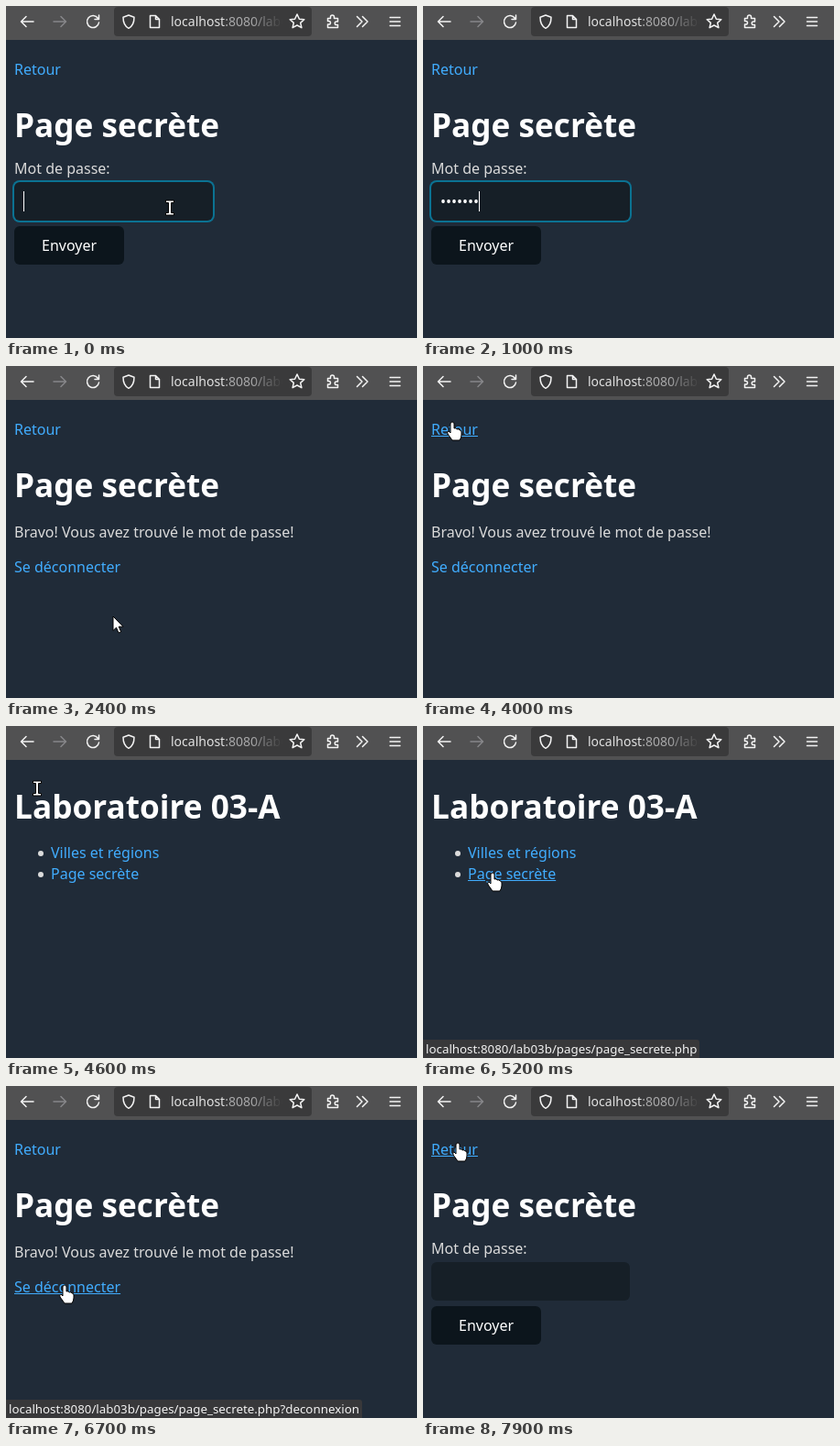
These frames come from a looping animation (449 px wide and 362 px high, 8 s). An HTML page:

```html
<!DOCTYPE html>
<html lang="fr">
<head>
<meta charset="utf-8">
<style>
html, body { margin: 0; width: 100%; height: 100%; overflow: hidden; background: #202b38; }
body { position: relative; font: 16px/22px "Noto Sans", sans-serif; color: #dbdbdb; cursor: default; }
body > * { position: absolute; left: 9px; margin: 0; white-space: pre; }
h1 { font-size: 35.2px; line-height: 48px; font-weight: 700; color: #fff; }
h1, p { cursor: text; }
a { color: #41adff; cursor: pointer; }
a.hover { text-decoration: underline; }
li { list-style: none; left: 49px; }
li::before { content: ""; position: absolute; left: -14px; top: 9px; width: 6px; height: 6px; border-radius: 50%; background: #dbdbdb; }
#field { top: 192px; width: 197px; height: 22px; padding: 10px; border-radius: 6px; background: #161f27; color: #fff; cursor: text; }
#field.focus { box-shadow: 0 0 0 2px #0096bfab; }
#caret { display: inline-block; width: 1px; height: 22px; margin-right: -1px; background: #fff; vertical-align: top; }
#send { top: 240px; padding: 10px 30px; width: 60px; border-radius: 6px; background: #0c151c; color: #fff; cursor: pointer; }
#send.hover { background: #040a0f; }
#bar { left: 0; top: 0; }
#url { left: 180px; top: 7px; width: 122px; overflow: hidden; font-size: 14px; line-height: 20px; color: #a9a9aa;
  -webkit-mask: linear-gradient(90deg, #000 72%, transparent); mask: linear-gradient(90deg, #000 72%, transparent); }
#url b { font-weight: 400; color: #e2e2e2; }
#status { left: 0; top: 342px; height: 20px; padding: 0 3px; background: #38383a; color: #f2f2f2; font-size: 13.33px; line-height: 20px; border-radius: 0 3px 0 0; }
#pointer { left: 0; top: 0; pointer-events: none; }
</style>
</head>
<body>
<svg id="bar" width="449" height="37" fill="none" stroke="#f4f4f4" stroke-width="1.5" stroke-linejoin="round" stroke-linecap="round">
  <path d="M0 0H449V37H0Z" fill="#515152" stroke="none"/>
  <rect x="118" y="1" width="216" height="32" rx="4" fill="#3a3a3b" stroke="none"/>
  <path d="M30 17H17M22 11.5L16.5 17L22 22.5"/>
  <path d="M52 17H65M60 11.5L65.5 17L60 22.5" stroke="#87878a"/>
  <path id="reload" d="M100.5 13.5A6.5 6.5 0 1 0 101.5 18M101.5 10V14.5H97"/>
  <path id="stop" d="M89.5 11.5L100.5 22.5M100.5 11.5L89.5 22.5"/>
  <path d="M134 10L140 12.2C140 18 138.5 22 134 24.3C129.5 22 128 18 128 12.2Z"/>
  <path d="M157.500 10.500H163.500L167.500 14.500V23.500H157.500ZM163.500 10.500V14.500H167.500"/>
  <path d="M318 9L320.400 14.200L325.800 14.700L321.700 18.400L322.900 23.700L318 21L313.100 23.700L314.300 18.400L310.200 14.700L315.600 14.200Z"/>
  <path d="M351.500 13.500h3v-1.500a2 2 0 0 1 4 0v1.500h4v3.500h-1.500a1.800 1.800 0 0 0 0 3.600h1.500v3h-11v-3.500h1.200a1.800 1.800 0 0 0 0-3.600h-1.200z"/>
  <path d="M383.500 11.500L389 17L383.500 22.500M389.500 11.500L395 17L389.500 22.500"/>
  <path d="M419.500 12.500H430.500M419.500 17H430.500M419.500 21.500H430.500"/>
</svg>
<div id="url"><b>localhost</b>:8080/lab03b/pages</div>

<a data-on="login done" style="top:58px">Retour</a>
<h1 data-on="login done" style="top:105px">Page secrète</h1>

<p data-on="login" style="top:166px">Mot de passe:</p>
<div data-on="login" id="field"><span id="dots"></span><i id="caret"></i></div>
<div data-on="login" id="send">Envoyer</div>

<p data-on="done" style="top:170px">Bravo! Vous avez trouvé le mot de passe!</p>
<a data-on="done" style="top:208px">Se déconnecter</a>

<h1 data-on="home" style="top:63px">Laboratoire 03-A</h1>
<li data-on="home" style="top:127px"><a>Villes et régions</a></li>
<li data-on="home" style="top:150px"><a>Page secrète</a></li>

<div id="status"></div>
<svg id="pointer" width="449" height="362"><path fill="#fff" stroke="#000" stroke-linejoin="round"/></svg>

<script>
const $ = id => document.getElementById(id);
const LOOP = 8000, STEP = 100;
const shapes = {
  default: 'M0 0V15.500L3.500 12.200L6 18L8.700 16.900L6.200 11.200H11Z',
  text: 'M-4.500 -8H4.500V-5.500H1.500V5.500H4.500V8H-4.500V5.500H-1.500V-5.500H-4.500Z',
  pointer: 'M-2 2Q-2 0 0 0Q2 0 2 2V7Q4.500 6 5 8Q7.500 7 8 9Q10 8.500 10 11V14Q10 17 8 20H0L-5 13Q-6 10 -4 10L-2 12Z'
};
// first step, last step, destination of the pointer
const start = [179, 220];
const moves = [
  [1400, 1400, 193, 222], [1500, 1700, 140, 274], [1900, 1900, 132, 273], [2100, 2200, 117, 273],
  [2900, 3100, 117, 261], [3400, 3900, 30, 50], [4000, 4000, 32, 61], [4200, 4200, 31, 61],
  [4600, 5100, 76, 160], [6100, 6600, 64, 217], [7500, 7900, 38, 62]
];
const pages = [[0, 'login'], [2400, 'done'], [4300, 'home'], [5500, 'done'], [7100, 'login']];
const links = [
  [4100, 4300, 'index.php'],
  [5200, 5500, 'pages/page_secrete.php'],
  [6700, 7100, 'pages/page_secrete.php?deconnexion']
];
const keys = [300, 400, 500, 600, 800, 900, 1000];
const parts = [...document.querySelectorAll('[data-on]')];
const hot = [...document.querySelectorAll('a, #send')];
const cursor = document.querySelector('#pointer path');

const show = (el, on) => el.style.visibility = on ? 'visible' : 'hidden';
const between = (t, a, b) => t >= a && t < b;

function pointerAt(t) {
  let [x, y] = start;
  for (const [from, to, nx, ny] of moves) {
    if (t < from) break;
    const p = Math.min(1, (t - from + STEP) / (to - from + STEP));
    const e = p * p * (3 - 2 * p);
    x += (nx - x) * e;
    y += (ny - y) * e;
  }
  return [Math.round(x), Math.round(y)];
}

function render(now) {
  const t = Math.floor(now % LOOP / STEP) * STEP;
  const page = pages.filter(([at]) => t >= at).pop()[1];
  for (const el of parts) el.hidden = !el.dataset.on.includes(page);

  const focused = t < 2400;
  $('field').classList.toggle('focus', focused);
  $('dots').textContent = focused ? '•'.repeat(keys.filter(k => t >= k).length) : '';
  show($('caret'), t < 1600);
  $('send').style.transform = t === 2300 ? 'translateY(2px)' : '';

  const loading = t === 5400;
  show($('stop'), loading);
  show($('reload'), !loading);

  const link = links.find(([a, b]) => between(t, a, b));
  show($('status'), link);
  $('status').textContent = link ? 'localhost:8080/lab03b/' + link[2] : '';

  const [x, y] = pointerAt(t);
  const visible = !between(t, 200, 1400);
  const under = document.elementFromPoint(x, y) || document.body;
  for (const el of hot) el.classList.toggle('hover', visible && el === under);
  show(cursor, visible);
  cursor.setAttribute('d', shapes[getComputedStyle(under).cursor] || shapes.default);
  cursor.setAttribute('transform', `translate(${x} ${y})`);
  requestAnimationFrame(render);
}
requestAnimationFrame(render);
</script>
</body>
</html>
```
